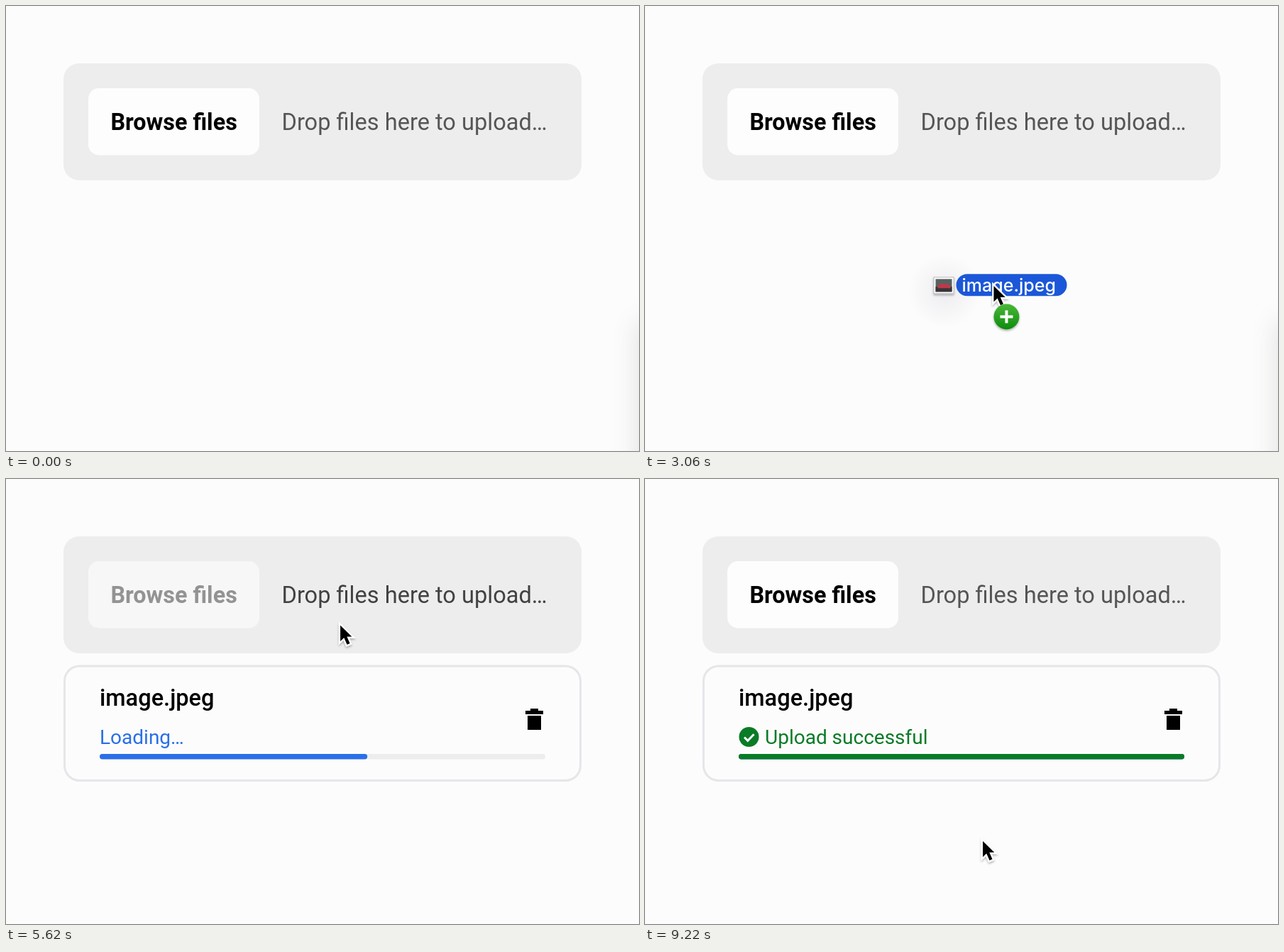
An HTML page for the animation above (9.26 s loop, 892 by 628 pixels).

```html
<!DOCTYPE html>
<html lang="en">
<head>
<meta charset="utf-8">
<title>File upload</title>
<style>
  html, body { margin: 0; width: 100%; height: 100%; overflow: hidden; background: #fcfcfc; }
  svg { display: block; width: 100vw; height: 100vh; }
  text { font-family: Roboto, Arial, sans-serif; }
  .tag { font: 500 25px Inter, "Open Sans", sans-serif; }
</style>
</head>
<body>
<svg viewBox="0 0 892 628">
  <defs>
    <filter id="soft" x="-100%" y="-100%" width="300%" height="300%"><feGaussianBlur stdDeviation="17"/></filter>
    <filter id="drop" x="-50%" y="-50%" width="200%" height="200%">
      <feDropShadow dx="0" dy="2" stdDeviation="1.6" flood-opacity=".3"/>
    </filter>
    <radialGradient id="glow">
      <stop offset="0" stop-color="#44446a" stop-opacity=".08"/>
      <stop offset="1" stop-color="#44446a" stop-opacity="0"/>
    </radialGradient>
    <linearGradient id="green" x2="0" y2="1">
      <stop offset="0" stop-color="#4cb83a"/>
      <stop offset="1" stop-color="#0c8c0c"/>
    </linearGradient>
  </defs>

  <rect width="892" height="628" fill="#fcfcfc"/>
  <rect id="edge" x="888" y="445" width="200" height="400" fill="#555562" filter="url(#soft)"/>

  <g id="panel">
    <rect x="82.5" y="264" width="727" height="161.5" rx="21" fill="#fcfcfc" stroke="#e6e6ea" stroke-width="3"/>
    <g id="content">
      <text x="132" y="320" font-size="32.5" font-weight="500">image.jpeg</text>
      <path d="M739 324h11v3h7v5h-25v-5h7zM735 334h19v20h-19z"/>
      <text id="loading" x="132" y="374" font-size="28" fill="#2a6fe8">Loading…</text>
      <g id="success" fill="#0a7b26">
        <circle cx="146.5" cy="364" r="14"/>
        <path d="M140 364.500l4.800 4.800 8.700-9" fill="none" stroke="#fcfcfc" stroke-width="3"/>
        <text x="169" y="374" font-size="28">Upload successful</text>
      </g>
      <rect x="132" y="388" width="628" height="7.500" rx="3.700" fill="#ededee"/>
      <rect id="bar" x="132" y="388" height="7.500" rx="3.700" fill="#2a6fe8"/>
      <rect id="done" x="132" y="388" width="628" height="7.500" rx="3.700" fill="#0a7b26"/>
    </g>
  </g>

  <rect id="ring" x="80" y="80" width="732" height="167" rx="23" fill="none" stroke="#a9b4ea" stroke-width="2"/>
  <rect x="81" y="81" width="730" height="165" rx="22" fill="#ededee"/>
  <rect id="button" x="116" y="116" width="241" height="94.500" rx="15" fill="#fdfdfd"/>
  <text id="label" x="147.500" y="174.500" font-size="32.3" font-weight="600">Browse files</text>
  <text id="hint" x="388.500" y="174.500" font-size="32.6">Drop files here to upload…</text>

  <g id="file">
    <circle cx="-16" cy="24" r="52" fill="url(#glow)"/>
    <g filter="url(#drop)">
      <rect x="-31.500" y="4.500" width="28" height="23" fill="#fff" stroke="#b9b9bd" stroke-width="1"/>
    </g>
    <rect x="-29" y="7" width="23" height="18" fill="#5a6060"/>
    <rect x="-29" y="18" width="23" height="7" fill="#34353a"/>
    <path d="M-26 17l4-3h9l5 3v3h-18z" fill="#c03848"/>
    <rect width="156" height="31" rx="15.500" fill="#1b57d8"/>
    <text class="tag" x="8" y="25" fill="#fff">image.jpeg</text>
  </g>

  <g id="cursor">
    <g filter="url(#drop)">
      <path d="M0 0v22.500l5.200-5 4.300 9.800 4-1.700-4.200-9.600h7z" fill="#fff" stroke="#fff" stroke-width="4.500"/>
    </g>
    <path d="M0 0v22.500l5.200-5 4.300 9.800 4-1.700-4.200-9.600h7z"/>
    <g id="badge" filter="url(#drop)">
      <circle cx="18" cy="43.500" r="18" fill="url(#green)"/>
      <path d="M18 34.500v18M9 43.500h18" stroke="#fff" stroke-width="4"/>
    </g>
  </g>
</svg>
<script>
const LOOP = 9260, ENTER = 560, DROP = 4600, DONE = 6420;
const LEAD = 33; // the dragged file runs slightly ahead of the pointer

// time, x, y of the pointer
const drag = [
  [480, 880, 730], [800, 690, 560], [1150, 480, 412], [1520, 352, 408], [1745, 230, 408],
  [2080, 456, 469], [2400, 590, 412], [2750, 670, 430], [3060, 492, 395], [3240, 396, 370],
  [3600, 405, 250], [4000, 450, 205], [4400, 469, 197], [5500, 469, 197]
];
const free = [
  [5500, 469, 197], [6000, 488, 280], [6700, 506, 349], [7250, 493, 420],
  [7940, 493, 420], [8540, 476, 511]
];

const el = {};
document.querySelectorAll("svg [id]").forEach(n => el[n.id] = n);

const clamp = v => Math.min(1, Math.max(0, v));
const ramp = (t, start, span) => clamp((t - start) / span);
const fade = (node, v) => node.setAttribute("opacity", v);
const move = (node, x, y) => node.setAttribute("transform", `translate(${x} ${y})`);

// cubic through the keys, flat wherever a coordinate turns back
function spline(keys, t) {
  const last = keys.length - 1;
  if (t <= keys[0][0]) return keys[0].slice(1);
  if (t >= keys[last][0]) return keys[last].slice(1);
  const i = keys.findIndex(k => k[0] > t) - 1;
  const a = keys[i], b = keys[i + 1], span = b[0] - a[0], u = (t - a[0]) / span;
  const slope = (j, c) => {
    if (j === 0 || j === last) return 0;
    const p = keys[j - 1], k = keys[j], n = keys[j + 1];
    return (k[c] - p[c]) * (n[c] - k[c]) <= 0 ? 0 : (n[c] - p[c]) / (n[0] - p[0]);
  };
  return [1, 2].map(c =>
    (1 + 2 * u) * (1 - u) ** 2 * a[c] + u * (1 - u) ** 2 * span * slope(i, c) +
    u * u * (3 - 2 * u) * b[c] + u * u * (u - 1) * span * slope(i + 1, c));
}

function draw(t) {
  const dragging = t >= ENTER && t < DROP;
  const [x, y] = spline(t < 5500 ? drag : free, t);
  fade(el.cursor, t >= ENTER ? 1 : 0);
  move(el.cursor, x, y);
  fade(el.badge, dragging ? 1 : 0);
  fade(el.file, dragging ? 1 : 0);
  const [fx, fy] = spline(drag, t + LEAD);
  move(el.file, fx - 32, fy - 13);
  fade(el.edge, t < DROP ? .14 : 0);

  const hover = ramp(t, 3600, 150) - ramp(t, 5830, 150);
  const shade = Math.round(85 - 20 * hover);
  el.hint.setAttribute("fill", `rgb(${shade},${shade},${shade})`);
  fade(el.ring, ramp(t, 3600, 150) - ramp(t, DROP, 200));
  const disabled = ramp(t, DROP, 150) - ramp(t, DONE, 150);
  fade(el.button, 1 - .3 * disabled);
  fade(el.label, 1 - .6 * disabled);

  const p = ramp(t, 4700, 700), rest = (1 - p) ** 1.7;
  fade(el.panel, p);
  move(el.panel, 0, -181 * rest);
  move(el.content, 0, -144 * rest);
  el.bar.setAttribute("width", 628 * ramp(t, 4720, 1500));
  const ok = ramp(t, DONE, 150);
  fade(el.loading, 1 - ok);
  fade(el.success, ok);
  fade(el.done, ok);
}

const start = performance.now();
function tick() {
  draw((performance.now() - start) % LOOP);
  requestAnimationFrame(tick);
}
tick();
</script>
</body>
</html>
```
